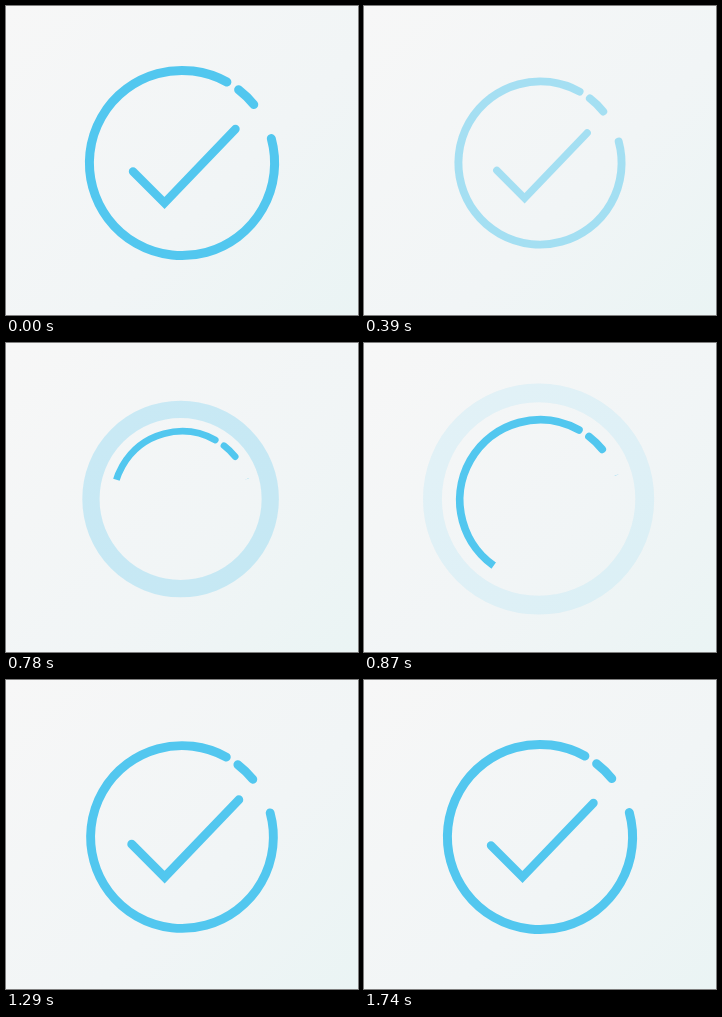
Write an HTML page with a canvas that moves like this. It is 352 px wide and 309 px high and loops after 1770 ms.

```html
<!DOCTYPE html>
<html lang="en">
<head>
<meta charset="utf-8">
<title>Check mark</title>
<style>
  html, body { margin: 0; width: 100%; height: 100%; overflow: hidden; }
  body { background: linear-gradient(135deg, #f7f7f7, #f1f5f6 60%, #eaf4f4); }
  canvas { display: block; }
</style>
</head>
<body>
<canvas id="stage" width="352" height="309"></canvas>
<script>
const ctx = document.getElementById('stage').getContext('2d');
const LOOP = 1770, BLUE = '#52c7ef', CX = 176, CY = 157, R = 92.6;
const rad = deg => deg * Math.PI / 180;
const clamp = x => Math.min(1, Math.max(0, x));

// Springy growth: [ms since start, share of the full size]
const SPRING = [[0, 0], [60, .18], [180, .48], [270, .73], [390, 1], [450, 1.072],
  [500, 1.083], [560, 1.06], [690, .974], [780, .982], [870, 1], [960, 1.007], [1140, 1]];

// Smooth curve through the spring's points
function spring(t) {
  const k = SPRING, last = k.length - 1;
  if (t <= 0) return 0;
  if (t >= k[last][0]) return 1;
  const i = k.findIndex(p => p[0] > t) - 1;
  const slope = j => {
    const a = k[Math.max(0, j - 1)], b = k[Math.min(last, j + 1)];
    return (b[1] - a[1]) / (b[0] - a[0]);
  };
  const [t0, v0] = k[i], [t1, v1] = k[i + 1], h = t1 - t0, s = (t - t0) / h;
  return v0 + (v1 - v0) * s * s * (3 - 2 * s)
    + h * s * (1 - s) * (slope(i) * (1 - s) - slope(i + 1) * s);
}

function scaleAbout(x, y, s) {
  ctx.translate(x, y);
  ctx.scale(s, s);
  ctx.translate(-x, -y);
}

function arc(from, to) {
  ctx.beginPath();
  ctx.arc(CX, CY, R, rad(from), rad(to));
  ctx.stroke();
}

// The broken circle, uncovered counterclockwise by a wedge
function drawCircle(scale, sweep) {
  if (sweep <= 0) return;
  ctx.save();
  scaleAbout(CX, CY, scale);
  if (sweep < 360) {
    ctx.beginPath();
    ctx.moveTo(CX, CY);
    ctx.arc(CX, CY, 200, rad(-18), rad(-18 - sweep), true);
    ctx.clip();
  }
  ctx.lineWidth = 9;
  arc(-15.3, 299);
  arc(-52.3, -39.2);
  ctx.restore();
}

function drawCheck(scale) {
  if (scale <= 0) return;
  ctx.save();
  scaleAbout(156, 194.5, scale);
  ctx.lineWidth = 8.4;
  ctx.beginPath();
  ctx.moveTo(127, 165.5);
  ctx.lineTo(158.5, 197);
  ctx.lineTo(229.5, 123);
  ctx.stroke();
  ctx.restore();
}

function drawRing(t) {
  const p = (t - 595) / 310;
  if (p <= 0 || p >= 1.11) return;
  const q = clamp(p), outer = 117 * q * (2 - q), width = Math.min(outer, 7.9 + .095 * outer);
  ctx.save();
  ctx.globalAlpha = clamp(.575 - .517 * p);
  ctx.lineWidth = width;
  ctx.beginPath();
  ctx.arc(174.6, 156, outer - width / 2, 0, 2 * Math.PI);
  ctx.stroke();
  ctx.restore();
}

function draw(t) {
  ctx.clearRect(0, 0, 352, 309);
  ctx.strokeStyle = BLUE;
  ctx.lineCap = 'round';
  ctx.lineJoin = 'miter';
  if (t < 450) {
    // Swells, then shrinks and fades away
    const p = t < 270 ? 0 : (t - 240) / 211;
    ctx.save();
    ctx.globalAlpha = 1 - p * p;
    scaleAbout(CX, CY, 1 - p * p * (2.7 * p - 1.7));
    drawCircle(1, 360);
    drawCheck(1);
    ctx.restore();
  } else if (t >= 595) {
    drawRing(t);
    drawCircle(.5 + .5 * spring(t - 600), (t - 600) * .8);
    drawCheck(spring(t - 870));
  }
}

const start = performance.now();
function frame() {
  draw((performance.now() - start) % LOOP);
  requestAnimationFrame(frame);
}
frame();
</script>
</body>
</html>
```
